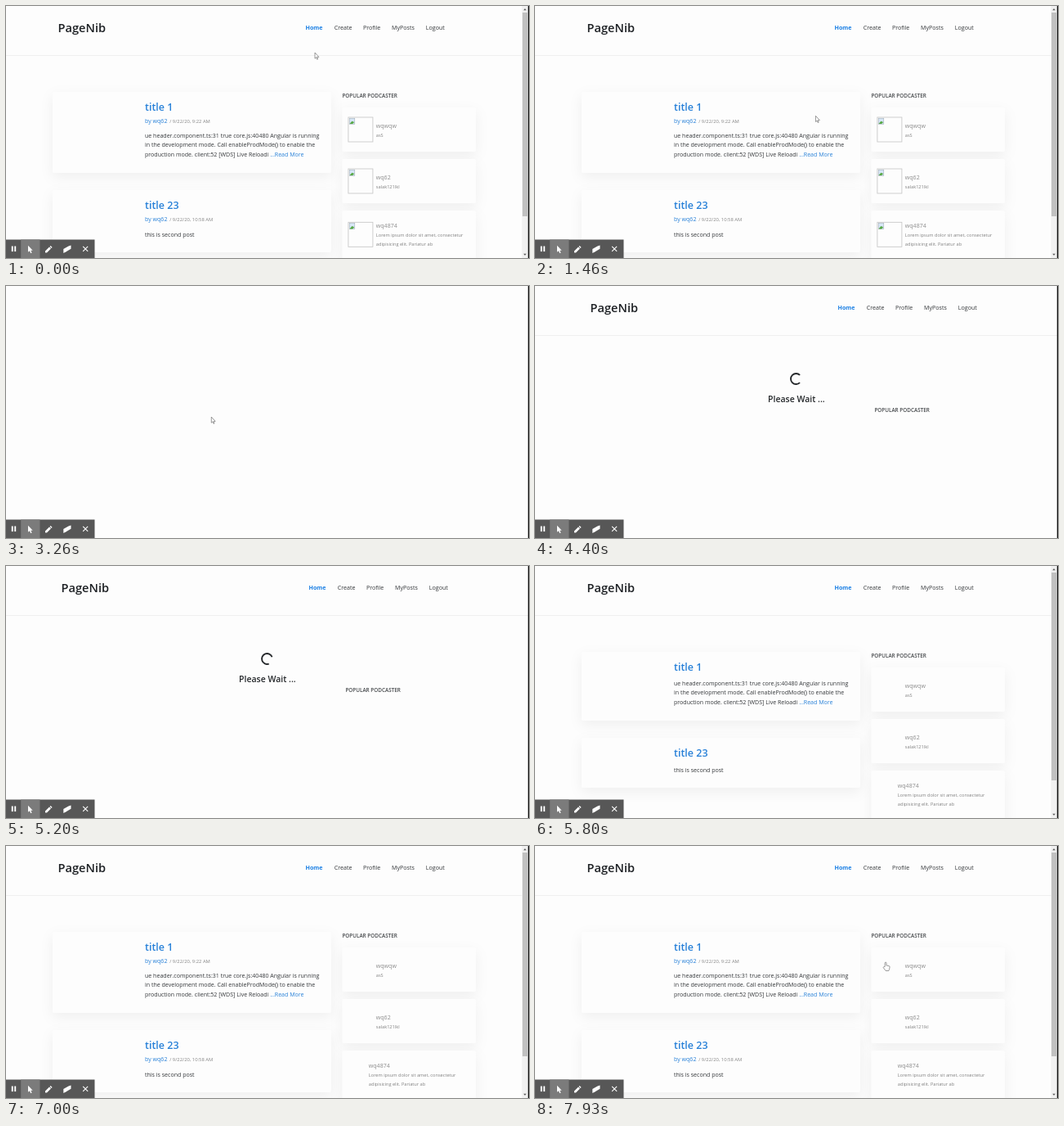
An HTML page that plays this animation: 640x308 px, repeating every 8 s.

```html
<!DOCTYPE html>
<html lang="en">
<head>
<meta charset="utf-8">
<title>Blog reload</title>
<style>
  html, body { margin: 0; width: 100%; height: 100%; overflow: hidden; background: #fdfdfd; }
  svg { display: block; width: 100vw; height: 100vh; }
  text { font: 7.06px "Open Sans", "Noto Sans", sans-serif; fill: #34373a; white-space: pre; }
  .brand { font-size: 14.6px; font-weight: 600; fill: #1d2024; }
  .nav { font-size: 7.1px; }
  .active { font-weight: 700; fill: #1a7fe4; }
  .title { font-size: 12.5px; font-weight: 600; fill: #2780d8; }
  .link { fill: #2780d8; }
  .date { font-size: 5.85px; fill: #858585; }
  .side { font-size: 6.36px; font-weight: 600; fill: #45484b; }
  .user { fill: #8c8c8c; }
  .bio { font-size: 5.65px; fill: #808080; }
  .wait { font-size: 10.5px; font-weight: 600; fill: #25282b; }
  .card { fill: #fdfdfd; filter: drop-shadow(0 5px 8px rgba(0, 0, 0, .055)); }
</style>
</head>
<body>
<svg id="stage" viewBox="0 0 640 308" preserveAspectRatio="none"></svg>
<script>
const LOOP = 8000, BLANK = 1600, WAIT = 4400, POSTS = 5260, AUTHORS = 6600, HAND = 7530;
const stage = document.getElementById('stage');

const text = (x, y, cls, s) => `<text x="${x}" y="${y}" class="${cls}">${s}</text>`;
const rect = (x, y, w, h, attrs) => `<rect x="${x}" y="${y}" width="${w}" height="${h}" ${attrs}/>`;
const path = (d, attrs) => `<path d="${d}" ${attrs}/>`;
const card = (x, y, w, h) => rect(x, y, w, h, 'rx="2" class="card"');
const group = (id, body) => `<g id="${id}">${body}</g>`;

function header(dx) {
  const items = [[366.5, 'Home'], [401.8, 'Create'], [437, 'Profile'], [472, 'MyPosts'], [513.8, 'Logout']];
  return rect(0, 60, 640, 1, 'fill="#efefef"') + text(63.5 + dx, 32.2, 'brand', 'PageNib') +
    items.map(([x, s], i) => text(x + dx, 29.2, i ? 'nav' : 'nav active', s)).join('');
}

function author(y, time) {
  return text(170, y, 'link', 'by wq62') + text(200.2, y, 'date', `/ 9/22/20, ${time} AM`);
}

// The author line pushes everything under it down by 15px.
function posts(withAuthors) {
  const d = withAuthors ? 15 : 0;
  const lines = [
    'ue header.component.ts:31 true core.js:40480 Angular is running',
    'in the development mode. Call enableProdMode() to enable the',
    'production mode. client:52 [WDS] Live Reloadi <tspan class="link">...Read More</tspan>'
  ];
  return card(57, 105, 341, 84 + d) + card(57, 210 + d, 341, 61 + d) +
    text(170, 128, 'title', 'title 1') + text(170, 233 + d, 'title', 'title 23') +
    lines.map((s, i) => text(170, 146.2 + d + i * 11.2, '', s)).join('') +
    text(170, 251.6 + 2 * d, '', 'this is second post') +
    (d ? author(142.6, '9:22') + author(262.8, '10:58') : '');
}

function avatar(y) {
  return rect(418.9, y, 30, 30, 'fill="none" stroke="#c4c4c4" stroke-width=".8"') +
    rect(420.2, y + 1.2, 6.6, 7.2, 'fill="#d7e6f7" stroke="#9aa5b0" stroke-width=".5"') +
    path(`M420.5 ${y + 8.1}l2.8-3.4 3 1.2-2.2 2.2z`, 'fill="#57a845"');
}

function sidebar(withAvatars) {
  const x = withAvatars ? 452.8 : 443.8;
  return text(411.4, 111.5, 'side', 'POPULAR PODCASTER') +
    [124, 187, 250].map((y, i) => card(411.5, y, 163.5, i < 2 ? 54 : 66)).join('') +
    text(452.8, 148.6, 'user', 'wqwqw') + text(452.8, 159.8, 'bio', 'asS') +
    text(452.8, 211.8, 'user', 'wq62') + text(452.8, 223, 'bio', 'salak121lkl') +
    text(x, 271, 'user', 'wq4874') +
    text(x, 282.2, 'bio', 'Lorem ipsum dolor sit amet, consectetur') +
    text(x, 293.4, 'bio', 'adipisicing elit. Pariatur ab') +
    (withAvatars ? [136, 199, 264.3].map(avatar).join('') : '');
}

function scrollbar() {
  return rect(631.3, 0, 7.5, 308, 'fill="#f1f1f1"') +
    rect(632, 8, 6, 249, 'id="thumb" fill="#c1c1c1"') +
    path('M633.2 5.2h3.6l-1.8-2.2zM633.2 302.8h3.6l-1.8 2.2z', 'fill="#606060"');
}

function toolbar() {
  return rect(0, 285.5, 108.5, 22.5, 'fill="#575757"') + rect(18.2, 285.5, 23.3, 22.5, 'fill="#7b7b7b"') +
    '<g fill="#fff">' +
    rect(6.8, 293.5, 1.9, 6.6, '') + rect(10.3, 293.5, 1.9, 6.6, '') +
    path('M27 292.8v8l1.9-1.6 1.4 3 1.3-.6-1.4-2.9h2.5z', '') +
    path('M48 301.5v-2l5-5 2 2-5 5zM53.6 293.9l1-1 2 2-1 1z', '') +
    path('M70.3 297l6.2-3.4 3-1v4.2l-6.2 3.6-3 1.6z', '') + '</g>' +
    path('M94.2 293.9l6 6m0-6l-6 6', 'stroke="#fff" stroke-width="1.1"');
}

const waiting = header(4) + text(415.4, 153.9, 'side', 'POPULAR PODCASTER') +
  text(285, 142, 'wait', 'Please Wait ...') +
  path('M324.1 118.1A6.5 6.5 0 1 1 324.1 108.9', 'id="spinner" fill="none" stroke="#25282b" stroke-width="1.9"');

const arrow = path('M0 0V7.2L1.6 5.8 2.7 8.3 3.7 7.8 2.6 5.4H4.9Z', 'fill="#fff" stroke="#666" stroke-width=".65"');
const hand = path('M2.2 5.5V1a.9.9 0 0 1 1.8 0V4l3 .5q1.2.3 1.1 1.5L7.5 8.8 6.8 10.5H3.2L.2 6.6Q.3 5.3 2.2 5.5Z',
  'fill="#fff" stroke="#666" stroke-width=".65" stroke-linejoin="round"');

stage.innerHTML =
  group('page', header(0) + group('plain', posts(false)) + group('full', posts(true)) +
    group('broken', sidebar(true)) + group('loading', sidebar(false)) + scrollbar()) +
  group('waiting', waiting) +
  rect(638.8, 0, 1.2, 308, 'fill="#111"') +
  toolbar() + group('arrow', arrow) + group('hand', hand);

const part = Object.fromEntries([...stage.querySelectorAll('[id]')].map(el => [el.id, el]));

// Pointer stops: time, x, y
const arrowStops = [
  [60, 378, 57], [260, 388, 82], [530, 388, 82], [800, 360, 122], [1130, 360, 122],
  [1260, 350, 131], [1400, 350, 131], [1460, 343.5, 134.3], [1600, 343.5, 134.3], [2330, 412, 135.5],
  [2400, 404, 136], [2460, 397, 137], [2800, 297, 147], [3130, 297, 147], [3260, 251.3, 160]
];
const handStops = [[7530, 438, 190], [7930, 426, 142]];

function along(stops, t) {
  const next = stops.findIndex(stop => stop[0] > t);
  if (next === 0) return stops[0].slice(1);
  if (next < 0) return stops[stops.length - 1].slice(1);
  const [t0, x0, y0] = stops[next - 1], [t1, x1, y1] = stops[next];
  const k = (t - t0) / (t1 - t0), e = k * k * (3 - 2 * k);
  return [x0 + (x1 - x0) * e, y0 + (y1 - y0) * e];
}

const show = (el, on) => el.setAttribute('display', on ? 'inline' : 'none');
const move = (el, [x, y]) => el.setAttribute('transform', `translate(${x} ${y})`);

function draw(now) {
  const t = now % LOOP;
  const before = t < BLANK, full = before || t >= AUTHORS;
  show(part.page, before || t >= POSTS);
  show(part.full, full);
  show(part.plain, !full);
  show(part.broken, before);
  show(part.loading, !before);
  part.thumb.setAttribute('height', full ? 249 : 254);
  show(part.waiting, t >= WAIT && t < POSTS);
  part.spinner.setAttribute('transform', `rotate(${(t - WAIT) / 750 * 360} 319.5 113.5)`);
  show(part.arrow, t < WAIT);
  show(part.hand, t >= HAND);
  move(part.arrow, along(arrowStops, t));
  move(part.hand, along(handStops, t));
}

const start = performance.now();
function tick() {
  draw(performance.now() - start);
  requestAnimationFrame(tick);
}
tick();
</script>
</body>
</html>
```
